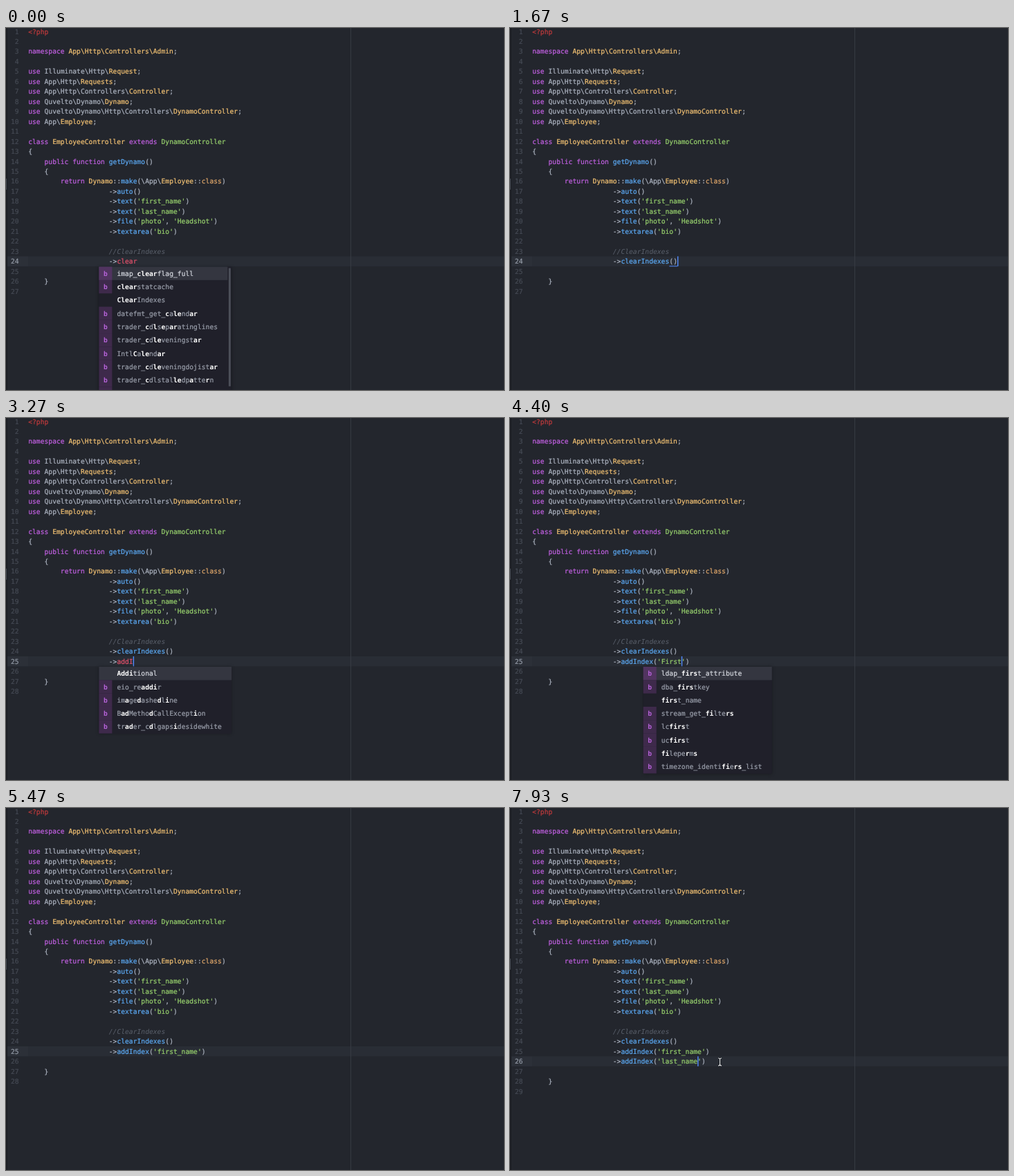
Write an HTML page with a canvas that moves like this. It is 720 px wide and 524 px high and loops after 8000 ms.

```html
<!DOCTYPE html>
<html lang="en">
<head>
<meta charset="utf-8">
<title>Editor autocomplete</title>
<style>
  html, body { margin: 0; width: 100%; height: 100%; overflow: hidden; background: #23262d; }
  canvas { display: block; width: 720px; height: 524px; }
</style>
</head>
<body>
<canvas id="stage"></canvas>
<script>
const W = 720, H = 524, LOOP = 8000;
const CHAR = 5.827, LEFT = 32.2, PITCH = 14.465, ROW = 19.3;
const FONT = '9.68px "DejaVu Sans Mono", monospace';
const COLORS = {
  n: '#abb2bf', p: '#bf5fdf', y: '#efbf72', b: '#5ba8f2', g: '#96cf6c',
  r: '#e0506a', t: '#bd3a3c', o: '#dda569', c: '#5a606b'
};

// «x...» marks a run drawn in colour x.
const head = String.raw`«t<?php»

«pnamespace» «yApp\Http\Controllers\Admin»;

«puse» Illuminate\Http\«yRequest»;
«puse» App\Http\«yRequests»;
«puse» App\Http\Controllers\«yController»;
«puse» Quvelto\Dynamo\«yDynamo»;
«puse» Quvelto\Dynamo\Http\Controllers\«yDynamoController»;
«puse» App\«yEmployee»;

«pclass» «yEmployeeController» «pextends» «gDynamoController»
{
    «ppublic function» «bgetDynamo»()
    {
        «preturn» «yDynamo»::«bmake»(\App\«yEmployee»::«oclass»)
                    ->«bauto»()
                    ->«btext»(«g'first_name'»)
                    ->«btext»(«g'last_name'»)
                    ->«bfile»(«g'photo'», «g'Headshot'»)
                    ->«btextarea»(«g'bio'»)

                    «c//ClearIndexes»`.split('\n');
const finished = ['->clearIndexes()', "->addIndex('first_name')"];

// Suggestion pools; a leading "-" means no type icon.
const pools = {
  clear: { col: 22, words: `imap_clearflag_full clearstatcache -ClearIndexes datefmt_get_calendar
    trader_cdlseparatinglines trader_cdleveningstar IntlCalendar trader_cdleveningdojistar
    trader_cdlstalledpattern collator_create_array` },
  add: { col: 22, words: `-Additional eio_readdir imagedashedline BadMethodCallException
    trader_cdlgapsidesidewhite addslashes addcslashes date_add array_pad array_map` },
  first: { col: 32, words: `ldap_first_attribute dba_firstkey -first_name stream_get_filters lcfirst
    ucfirst fileperms timezone_identifiers_list fopen fclose` },
  last: { col: 32, words: `-last_name json_last_error error_get_last preg_last_error
    libxml_get_last_error class_exists localtime trader_cdlgapsidesidewhite levenshtein ldap_list` }
};
for (const pool of Object.values(pools)) pool.words = pool.words.split(/\s+/);

// [start, row, text, caret distance from the end, pool, query]
const steps = [
  [-400, 0, '->clear', 0, 'clear', 'clear'],
  [70, 0, '->clearI', 0, 'clear', 'clear'],
  [130, 0, '->clearI', 0, 'clear', 'cleari'],
  [270, 0, '->clearIn', 0, 'clear', 'clearin'],
  [470, 0, '->clearInd', 0, 'clear', 'clearind'],
  [730, 0, '->clearInde', 0, 'clear', 'clearinde'],
  [870, 0, '->clearIndex', 0, 'clear', 'clearindex'],
  [1000, 0, '->clearIndexe', 0, 'clear', 'clearindexe'],
  [1070, 0, '->clearIndexes', 0, 'clear', 'clearindexes'],
  [1270, 0, '->clearIndexes()', 1],
  [1470, 0, '->clearIndexes()', 0],
  [2070, 1, '', 0],
  [2330, 1, '-', 0],
  [2530, 1, '->', 0],
  [2730, 1, '->a', 0, 'add', 'a'],
  [2930, 1, '->ad', 0, 'add', 'ad'],
  [3070, 1, '->add', 0, 'add', 'add'],
  [3270, 1, '->addI', 0, 'add', 'addi'],
  [3400, 1, '->addIn', 0, 'add', 'addin'],
  [3530, 1, '->addInd', 0],
  [3670, 1, '->addInde', 0],
  [3730, 1, '->addIndex', 0],
  [3930, 1, '->addIndex()', 1],
  [4130, 1, "->addIndex('')", 2],
  [4270, 1, "->addIndex('Fi')", 2, 'first', 'f'],
  [4330, 1, "->addIndex('Firs')", 2, 'first', 'fi'],
  [4400, 1, "->addIndex('First')", 2, 'first', 'firs'],
  [4470, 1, "->addIndex('First')", 2, 'first', 'first'],
  [4670, 1, "->addIndex('First_')", 2, 'first', 'first_'],
  [4800, 1, "->addIndex('First_n')", 2, 'first', 'first_n'],
  [4930, 1, "->addIndex('First_na')", 2, 'first', 'first_na'],
  [5070, 1, "->addIndex('first_name')", 2, 'first', 'first_name'],
  [5200, 1, "->addIndex('first_name')", 2],
  [5870, 2, "->addIndex('first_name')", 2],
  [7070, 2, "->addIndex('l')", 2],
  [7130, 2, "->addIndex('l')", 2, 'last', 'l'],
  [7200, 2, "->addIndex('la')", 2, 'last', 'la'],
  [7330, 2, "->addIndex('las')", 2, 'last', 'las'],
  [7400, 2, "->addIndex('last')", 2, 'last', 'last'],
  [7470, 2, "->addIndex('last_')", 2, 'last', 'last_'],
  [7600, 2, "->addIndex('last_n')", 2, 'last', 'last_n'],
  [7730, 2, "->addIndex('last_na')", 2, 'last', 'last_na'],
  [7800, 2, "->addIndex('last_name')", 2]
];
const SELECT_FROM = 6800, SELECT_TO = 7070;

const canvas = document.getElementById('stage');
const ctx = canvas.getContext('2d');
const dpr = window.devicePixelRatio || 1;
canvas.width = W * dpr;
canvas.height = H * dpr;
ctx.scale(dpr, dpr);

const colX = col => LEFT + col * CHAR;
const lineY = n => 5 + (n - 1) * PITCH;

function box(x, y, w, h, color) {
  ctx.fillStyle = color;
  ctx.fillRect(x, y, w, h);
}

function write(text, x, y, color, style = '') {
  ctx.font = style + ' ' + FONT;
  ctx.fillStyle = ctx.strokeStyle = color;
  ctx.fillText(text, x, y + 3.5);
  if (!style) ctx.strokeText(text, x, y + 3.5);
}

function drawCode(line, y) {
  let col = 0;
  line.split(/[«»]/).forEach((part, i) => {
    const kind = i % 2 ? part[0] : 'n';
    const text = i % 2 ? part.slice(1) : part;
    write(text, colX(col), y, COLORS[kind], kind === 'c' ? 'italic' : '');
    col += text.length;
  });
}

function methodCall(text) {
  const color = text.includes('(') ? 'b' : 'r';
  return ' '.repeat(20) + text.replace(/'.*'/, '«g$&»').replace(/>(\w+)/, `>«${color}$1»`);
}

// Places the query letters in a word, preferring adjacent ones.
function fit(word, query, from = 0) {
  if (!query) return { hits: [], score: 0 };
  let best = null;
  for (let i = from; i < word.length; i++) {
    if (word[i] !== query[0]) continue;
    const rest = fit(word, query.slice(1), i + 1);
    if (!rest) break;
    const score = rest.score + (rest.hits[0] === i + 1 ? 1 : 0);
    if (!best || score > best.score) best = { hits: [i, ...rest.hits], score };
  }
  return best;
}

const matchCache = {};
function suggestions(poolName, query) {
  return matchCache[poolName + query] ??= pools[poolName].words.map(entry => {
    const word = entry.replace('-', '');
    return { word, icon: entry === word, match: fit(word.toLowerCase(), query) };
  }).filter(item => item.match);
}

function drawPopup(poolName, query, line) {
  const items = suggestions(poolName, query);
  if (!items.length) return;
  const textX = colX(pools[poolName].col);
  const x = textX - 26, top = lineY(line) + 7.9;
  const longest = Math.max(...items.map(item => item.word.length));
  const width = Math.max(186, 40.3 + longest * CHAR);
  const scrolls = items.length > 9;
  ctx.save();
  ctx.shadowColor = 'rgba(0,0,0,.35)';
  ctx.shadowBlur = 5 * dpr;
  box(x, top, width + (scrolls ? 5.5 : 0), items.length * ROW + 0.5, '#20202a');
  ctx.restore();
  items.forEach(({ word, icon, match }, i) => {
    const y = top + i * ROW, mid = y + ROW / 2;
    if (!i) box(x, y, width, ROW, '#343640');
    if (icon) {
      box(x, y, 19, ROW, i ? '#3e2a4b' : '#513460');
      write('b', x + 6.6, mid, '#b562d8', 'bold');
    }
    [...word].forEach((letter, k) => {
      const hit = match.hits.includes(k);
      write(letter, textX + k * CHAR, mid, hit ? '#ffffff' : i ? '#989da9' : '#d3d6dd', hit ? 'bold' : '');
    });
  });
  if (scrolls) box(x + width + 1.5, top + 2, 3, 171, '#4b4e58');
}

function drawPointer(t) {
  let x, y;
  const ease = (from, to) => {
    const k = Math.min(1, Math.max(0, (t - from) / (to - from)));
    return k * k * (3 - 2 * k);
  };
  if (t >= 6330 && t < SELECT_TO) {
    const k = ease(6330, 6730);
    x = 303 - 63 * k;
    y = 392 - 25 * k;
  } else if (t >= 7730) {
    x = 240 + 63.5 * ease(7730, 7930);
    y = 367.5;
  } else return;
  ctx.beginPath();
  for (const s of [-1, 1]) {
    ctx.moveTo(x - 2.5, y + s * 5.5);
    ctx.quadraticCurveTo(x, y + s * 5.5, x, y + s * 3.5);
    ctx.quadraticCurveTo(x, y + s * 5.5, x + 2.5, y + s * 5.5);
  }
  ctx.moveTo(x, y - 4);
  ctx.lineTo(x, y + 4);
  ctx.save();
  for (const [color, width] of [['#15171b', 2.4], ['#e6e8ec', 1.1]]) {
    ctx.strokeStyle = color;
    ctx.lineWidth = width;
    ctx.stroke();
  }
  ctx.restore();
}

function draw(t) {
  const [start, row, text, back, poolName, query] = steps.findLast(step => step[0] <= t);
  const active = 24 + row, y = lineY(active);
  const selecting = t >= SELECT_FROM && t < SELECT_TO;
  const calls = [...finished.slice(0, row), text].map(methodCall);
  const lines = [...head, ...calls, '', '    }', ''];

  ctx.textRendering = 'geometricPrecision';
  ctx.lineWidth = 0.22;
  box(0, 0, W, H, '#23262d');
  box(0, 0, 2, H, '#1b1d23');
  box(0, 218, 1, 16, '#454952');
  box(2, y - 7.2, 30, PITCH, '#2c3038');
  if (!selecting) box(32, y - 7.2, W - 32, PITCH, '#292d35');
  box(498, 0, 1, H, '#363a42');
  if (selecting) box(colX(32), y - 7.2, 10 * CHAR, PITCH, '#3b444f');

  lines.forEach((line, i) => {
    const label = String(i + 1);
    write(label, 18.6 - label.length * CHAR, lineY(i + 1), i + 1 === active ? '#9299a5' : '#454a54');
    drawCode(line, lineY(i + 1));
  });

  const caret = text.length - back;
  const caretX = colX(20 + caret);
  if (/[()]/.test(text.slice(Math.max(0, caret - 1), caret + 1))) {
    for (const k of [text.indexOf('('), text.indexOf(')')])
      box(colX(20 + k), y + 6.6, CHAR, 1, '#528bff');
  }
  const blinkOn = Math.floor((t - start) / 400) % 2 === 0;
  const accepted = start === 5200 && Math.floor((t - 5070) / 400) % 2 === 1;
  const visible = start === 5200 ? !accepted : blinkOn;
  if (visible && !selecting) box(caretX, y - 7.2, 1.4, PITCH, '#528bff');

  if (poolName) drawPopup(poolName, query, active);
  drawPointer(t);
}

const began = performance.now();
function frame() {
  draw((performance.now() - began) % LOOP);
  requestAnimationFrame(frame);
}
frame();
</script>
</body>
</html>
```
